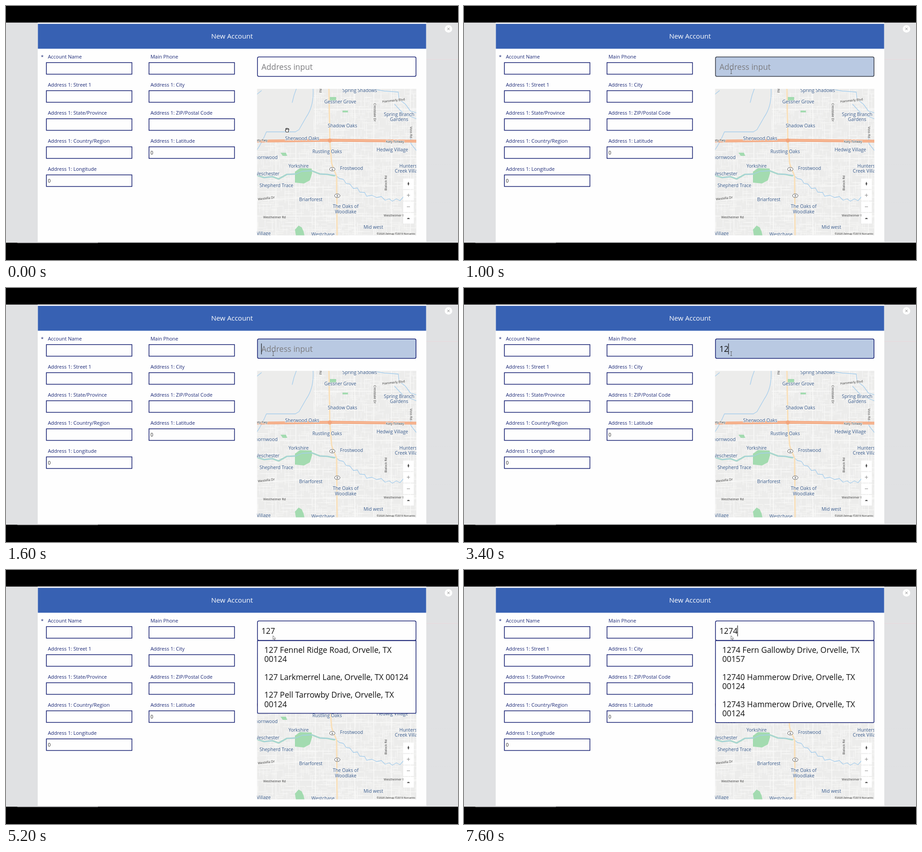
An HTML page for the animation above (8 s loop, 998 px wide and 561 px high).

```html
<!DOCTYPE html>
<html lang="en">
<head>
<meta charset="utf-8">
<title>New Account</title>
<style>
  html, body { margin: 0; width: 100%; height: 100%; overflow: hidden; background: #000; }
  svg { display: block; width: 998px; height: 561px; font-family: "Open Sans", sans-serif; }
  .label { font-size: 11px; fill: #1b2876; }
  .value { font-size: 10.5px; fill: #222; }
  .box { fill: #fefefe; stroke: #131d70; stroke-width: 1.5; }
  .big { font-size: 17.5px; fill: #111; }
  .place, .road { text-anchor: middle; paint-order: stroke; stroke: #f2f2f1; stroke-width: 2px; stroke-linejoin: round; }
  .place { font-size: 10.3px; fill: #37598a; }
  .road { font-size: 7px; fill: #333; }
  .line { fill: none; stroke-linecap: round; stroke-linejoin: round; }
</style>
</head>
<body>
<svg viewBox="0 0 998 561">
  <defs><clipPath id="mapClip"><rect x="554.5" y="183" width="351.5" height="323.5"/></clipPath></defs>
  <rect y="36.6" width="998" height="486.2" fill="#e0e1e3"/>
  <path d="M928 118h70" stroke="#e9d8dc"/>
  <path d="M928 350h70M928 434h70" stroke="#d9dadd" stroke-dasharray="3 2" opacity=".4"/>
  <rect x="70" y="36.6" width="858" height="484.6" fill="#fefefe"/>
  <path d="M25 523h178" stroke="#d0d0d0"/>
  <rect x="70.4" y="39.4" width="857.2" height="55" fill="#3761b3"/>
  <text x="499" y="72.3" font-size="15.1" fill="#fff" text-anchor="middle">New Account</text>
  <circle cx="977" cy="50.5" r="8.3" fill="#fff"/>
  <path d="M974.4 47.9l5.2 5.2m0-5.2l-5.2 5.2" stroke="#777" stroke-width=".9"/>
  <text class="label" x="77" y="115.5">*</text>
  <g id="form"></g>

  <g clip-path="url(#mapClip)">
    <rect x="554" y="183" width="353" height="324" fill="#ececeb"/>
    <path id="streets" class="line" stroke="#f9f9f8" stroke-width=".9"/>
    <path class="line" stroke="#fafaf9" stroke-width="1.5" d="M554 464H906M554 400H720M554 337H906M735 397H906M680 228H906M554 430L680 422H906M596 300V506M640 300V506M683 183V506M770 183V506M812 183V506M851 183V506M893 183V506"/>
    <g fill="#a3dbb0">
      <path d="M638 366l11-8 26 1 1 10-5 16-13 7-20-2z"/>
      <path d="M638 494l8-9 7 4 4 9 2 9h-19z"/>
      <path d="M715 201h14v10h-14zM743 231h12v4h-12zM606 324h12l3 7h-10z"/>
    </g>
    <path class="line" stroke="#a8dcb8" stroke-width="3.2" d="M554 374l16 5 18-2 14 5 18-10 18-1M675 364l18 7 17 1 15 3"/>
    <g class="line" stroke="#a5cdec" stroke-width="1.3">
      <path d="M554 374l16 5 18-2 14 5 18-10 20-1 14-6 21-1 18 7 17 1 18 2 8 7 9 2 6 9 8 1 8 10 9-1 5 9 11 1 4 8 12-2 10 5 11-2 8 8 9-3 7 5 9-5 8 4 13-15"/>
      <path d="M678 183q2 38-15 62l-16 28-8 5h-64q-10 24-21 40M641 183l-5 14-4 16M554 195l10-8M808 183l28 5 30 2 2 16 14 11 11 15 13 4M858 217l13 14 8 8 27 10M893 284l1 20 12 15"/>
    </g>
    <path class="line" stroke="#f9dfb8" stroke-width="3" d="M713 183l2 115 4 50 11 28 1 131"/>
    <path class="line" stroke="#f3a57c" stroke-width="6" d="M550 298.5L640 297.5 720 296.5 910 298.5"/>
    <path class="line" stroke="#fbd3b9" d="M550 298.5L640 297.5 720 296.5 910 298.5"/>
    <circle cx="715" cy="297" r="4.5" fill="#f3a57c"/>
    <g id="places"></g>
    <g id="controls" fill="#fff"></g>
    <path d="M888.5 388l2 4.5-2 4.5-2-4.5zM885.5 470.5l1.200-2.600h3.600l1.200 2.600z" fill="#555"/>
    <path d="M885 418h7m-3.5-3.5v7M885 443.5h7" stroke="#888"/>
    <text x="904" y="504.5" font-size="5.7" fill="#222" text-anchor="end">©2020 Zelmap ©2019 Norvantic</text>
  </g>

  <g id="list">
    <path id="listBox" class="box"/>
    <g id="listText" class="big"></g>
  </g>
  <rect id="input" class="box" x="555.3" y="112.5" width="350" height="43" rx="3"/>
  <text id="typed" class="big" x="564" y="141"></text>
  <rect id="caret" y="122.5" width="1.2" height="24" fill="#111"/>

  <path id="hand" fill="#fff" stroke="#333" stroke-width="1.1" stroke-linejoin="round" d="M617.5 271q2-1.5 5-.5 2.5.2 2 3l-1 2.5v2.5h-5l-2-4 1.5-.5zM619 271v2.5M621 270.5v3M623 271v2.5"/>
  <path id="beam" class="line" stroke="#555" stroke-width=".9" d="M588.5 140.500h3M590 140.500v9M588.500 149.500h3"/>
  <path id="arrow" fill="#fff" stroke="#666" stroke-width=".9" d="M589.5 145v8.300l2-1.700 1.300 3 1.300-.6-1.300-2.800h2.500z"/>
</svg>
<script>
const $ = id => document.getElementById(id);
const text = (cls, x, y, s, extra = "") => `<text class="${cls}" x="${x}" y="${y}" ${extra}>${s}</text>`;

// Form fields, two columns
const fields = ["Account Name", "Main Phone", "Address 1: Street 1", "Address 1: City",
  "Address 1: State/Province", "Address 1: ZIP/Postal Code", "Address 1: Country/Region",
  "Address 1: Latitude", "Address 1: Longitude"];
$("form").innerHTML = fields.map((name, i) => {
  const x = 89.2 + i % 2 * 226.5, y = 125 + (i >> 1) * 62;
  return text("label", x + 3.2, y - 9.2, name) +
    `<rect class="box" x="${x}" y="${y}" width="188.8" height="25.6"/>` +
    (i > 6 ? text("value", x + 3.2, y + 17, "0") : "");
}).join("");

// Side streets: short strokes, none in the open land at the upper left
let seed = 11;
const rnd = () => (seed = seed * 16807 % 2147483647) / 2147483647;
let streets = "";
for (let i = 0; i < 1700; i++) {
  const x = 552 + Math.round(rnd() * 88) * 4, y = 182 + Math.round(rnd() * 81) * 4;
  const length = 6 + rnd() * 20, dir = rnd() < 0.5 ? "h" : "v";
  if (x > 672 || y > 300) streets += `M${x} ${y}${dir}${length.toFixed(1)}`;
}
$("streets").setAttribute("d", streets);

const places = [["Spring Shadows", 781, 190], ["Gessner Grove", 738, 215], ["Spring Branch", 868, 243],
  ["Gardens", 868, 254], ["Shadow Oaks", 743, 268], ["Sherwood Oaks", 654, 296],
  ["Hedwig Village", 853, 321], ["Rustling Oaks", 709, 325], ["Thornwood", 572, 338],
  ["Yorkshire", 646, 357], ["Frostwood", 763, 362], ["Hunters", 888, 357], ["Creek Village", 889, 368],
  ["Weschester", 576, 374], ["Shepherd Trace", 597, 400], ["Briarforest", 673, 431],
  ["The Oaks of", 750, 446], ["Woodlake", 750, 457.5], ["Mid west", 811, 492],
  ["Village", 569, 506], ["Westchase", 700, 507.5]];
const roads = [["Hammerly Blvd", 856, 211, -6], ["Crestdale Dr", 812, 235, 90], ["Voss Rd", 892, 279, 90],
  ["Katy Tollway", 859, 302, 0], ["Katy Fwy", 563, 299, 0], ["Westella Dr", 575, 427, -7],
  ["Westheimer Rd", 593, 469, 0], ["Westheimer Rd", 859, 465, 0], ["Blalock Rd", 841, 391, -90], ["Rd", 692, 187, 90]];
const shields = [[720.5, 360.5], [731.5, 419]];
$("places").innerHTML =
  roads.map(([s, x, y, a]) => text("road", x, y, s, `transform="rotate(${a} ${x} ${y})"`)).join("") +
  places.map(([s, x, y]) => text("place", x, y, s)).join("") +
  shields.map(([x, y]) => `<ellipse cx="${x}" cy="${y}" rx="6" ry="4" fill="#fff" stroke="#555"/>` +
    text("road", x, y + 2.3, "8", 'style="font-size:6px"')).join("");
$("controls").innerHTML = [381, 406.3, 431.7, 457]
  .map(y => `<rect x="877" y="${y}" width="23.5" height="23.5"/>`).join("");

// Suggestions: bottom edge, then baseline and text of each line
const suggestions = [
  [316.5, [182.5, "127 Fennel Ridge Road, Orvelle, TX"], [203, "00124"],
    [242.5, "127 Larkmerrel Lane, Orvelle, TX 00124"],
    [282, "127 Pell Tarrowby Drive, Orvelle, TX"], [302.5, "00124"]],
  [337, [182.5, "1274 Fern Gallowby Drive, Orvelle, TX"], [203, "00157"],
    [242.5, "12740 Hammerow Drive, Orvelle, TX"], [263, "00124"],
    [302.5, "12743 Hammerow Drive, Orvelle, TX"], [323, "00124"]]
];
let shownList = -1;
function showList(index) {
  $("list").style.display = index < 0 ? "none" : "";
  if (index === shownList) return;
  shownList = index;
  if (index < 0) return;
  const [bottom, ...lines] = suggestions[index];
  $("listBox").setAttribute("d", `M555.3 156V${bottom - 2}q0 2 2 2H903.3q2 0 2-2V156z`);
  $("listText").innerHTML = lines.map(([y, s]) => text("big", 570.3, y, s)).join("");
}

const typing = [[2200, "12"], [4200, "127"], [6000, "1274"]];
const caretToggles = [1400, 2000, 2200, 2800, 3400, 3800, 4200, 4800, 5400, 6000, 6600, 7200, 7600];
const show = (id, on) => $(id).style.display = on ? "" : "none";

function draw(now) {
  const t = now % 8000;
  const value = typing.reduce((s, [at, v]) => t >= at ? v : s, "");
  const typed = $("typed");
  typed.textContent = value || "Address input";
  typed.style.fill = value ? "#111" : "#7d7d80";
  const active = t >= 800 && t < 5200;
  $("input").style.fill = active ? "#b9c9e2" : "#fefefe";
  $("input").style.stroke = t >= 800 && t < 1400 ? "#343944" : "#131d70";
  $("caret").setAttribute("x", 563.4 + value.length * 10.01);
  show("caret", caretToggles.filter(at => at <= t).length % 2);
  show("hand", t < 800);
  $("hand").setAttribute("transform", t < 600 ? "" : "translate(-4 1)");
  show("beam", t >= 800 && t < 5000);
  show("arrow", t >= 5000);
  showList(t < 5200 ? -1 : t < 6000 ? 0 : 1);
  requestAnimationFrame(() => draw(performance.now() - start));
}
const start = performance.now();
draw(0);
</script>
</body>
</html>
```
